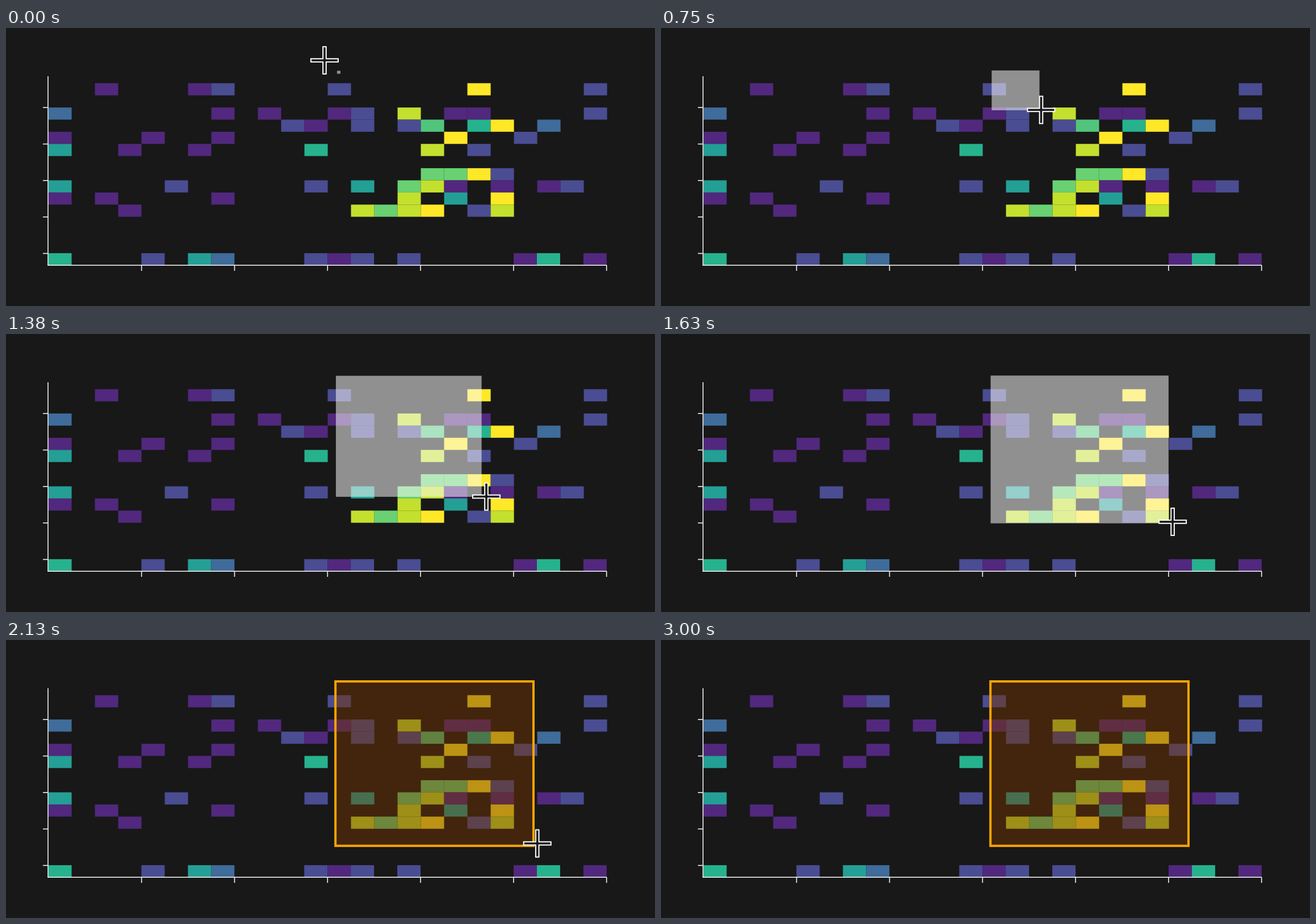
Recreate the animation shown at these times as a matplotlib script. Size 1143 px wide and 490 px high, loop 3.13 s.

```python
import numpy as np
import matplotlib.pyplot as plt
from matplotlib.animation import FuncAnimation
from matplotlib.collections import LineCollection, PatchCollection
from matplotlib.patches import Polygon, Rectangle

W, H, DPI = 1143, 490, 64
PX = 72 / DPI            # one pixel in points
TICK, LOOP, HOLD = 10, 3130, 125
BG = "#181818"

COLORS = {"P": "#51287d", "B": "#4a4d92", "L": "#3f6c9a", "T": "#249f95",
          "G": "#27b28e", "E": "#52c57c", "g": "#69d172", "Y": "#c4e02e",
          "y": "#fee827"}

ROWS = {
    0: "..P...PB....B.....y....B",
    2: "L......P.P..PB.Y.PP....B",
    3: "..........BP.B.BE.Gy.L..",
    4: "P...P..P.........y..B...",
    5: "T..P..P....G....Y.B.....",
    7: "................ggyB....",
    8: "T....B.....B.T.gYP.P.PB.",
    9: "P.P....P.......Y.T.y....",
    10: "...P.........YgYy.BY....",
    14: "G...B.TL...BPB.B....PG.P",
}

fig = plt.figure(figsize=(W / DPI, H / DPI), dpi=DPI, facecolor=BG)
ax = fig.add_axes([0, 0, 1, 1])
ax.set_xlim(0, W)
ax.set_ylim(H, 0)
ax.axis("off")


def draw_cells():
    cells, fills = [], []
    for r, line in ROWS.items():
        pitch = 40.97 if r == 14 else 41.0
        for c, key in enumerate(line):
            if key != ".":
                cells.append(Rectangle((74.6 + pitch * c, 97.3 + 21.4 * r),
                                       pitch, 21.4))
                fills.append(COLORS[key])
    ax.add_collection(PatchCollection(cells, facecolors=fills, linewidths=0,
                                      snap=False, zorder=1))


def draw_axes():
    lines = [[(74, 85), (74, 418.8)], [(73.2, 418.2), (1058, 418.2)]]
    lines += [[(x, 418), (x, 428)] for x in 238.7 + 163.8 * np.arange(6)]
    lines += [[(65, y), (74, y)] for y in 140.2 + 64.3 * np.arange(5)]
    ax.add_collection(LineCollection(lines, colors="#f0f0f0", snap=False,
                                     linewidths=1.6 * PX, zorder=2))


def plus(x, y, arm=24, half=2.8):
    a, h = arm, half
    pts = [(-h, -a), (h, -a), (h, -h), (a, -h), (a, h), (h, h),
           (h, a), (-h, a), (-h, h), (-a, h), (-a, -h), (-h, -h)]
    return np.array(pts) + (x, y)


def ease(step, keys, phases):
    return np.sin(np.pi / 2 * np.interp(step, keys, phases)) ** 2


def mix(a, b, s):
    return np.array(a) + (np.array(b) - np.array(a)) * s


def cursor_at(step):
    if step <= 16:
        s = ease(step, [0, 4, 8, 11, 16], [0, .2403, .4838, .6755, 1])
        return mix((561, 57), (935, 358.3), s)
    out = 6.22 * (step - 16.7) ** 1.794
    return 935 + out, 358.3 + 0.35 * out


def box_at(step):
    s = ease(step, [1, 4, 8, 11, 16], [0, .185, .449, .653, 1])
    return mix((583, 75.4, 589, 80.6), (580.2, 73, 929, 362.8), s)


draw_cells()
draw_axes()
veil = ax.add_patch(Rectangle((0, 0), 1, 1, lw=0, snap=False, zorder=3))
border = ax.add_patch(Rectangle((0, 0), 1, 1, fill=False, ec="#ffa500",
                                lw=4 * PX, joinstyle="miter", snap=False,
                                zorder=4))
cursor = ax.add_patch(Polygon(plus(0, 0), fc=BG, ec="white", lw=2 * PX,
                              joinstyle="miter", snap=False, zorder=5))


def update(i):
    step = i * TICK // HOLD
    chosen = step > 16
    x0, y0, x1, y1 = box_at(step)
    for box in (veil, border):
        box.set_bounds(x0, y0, x1 - x0, y1 - y0)
    tint = (115 / 255, 53 / 255, 0, .47) if chosen else (1, 1, 1, .52)
    veil.set_facecolor(tint)
    border.set_visible(chosen)
    cursor.set_xy(plus(*cursor_at(step)))
    cursor.set_visible(step < 24)
    return veil, border, cursor


anim = FuncAnimation(fig, update, frames=LOOP // TICK, interval=TICK,
                     repeat=True, repeat_delay=0)
plt.show()
```
